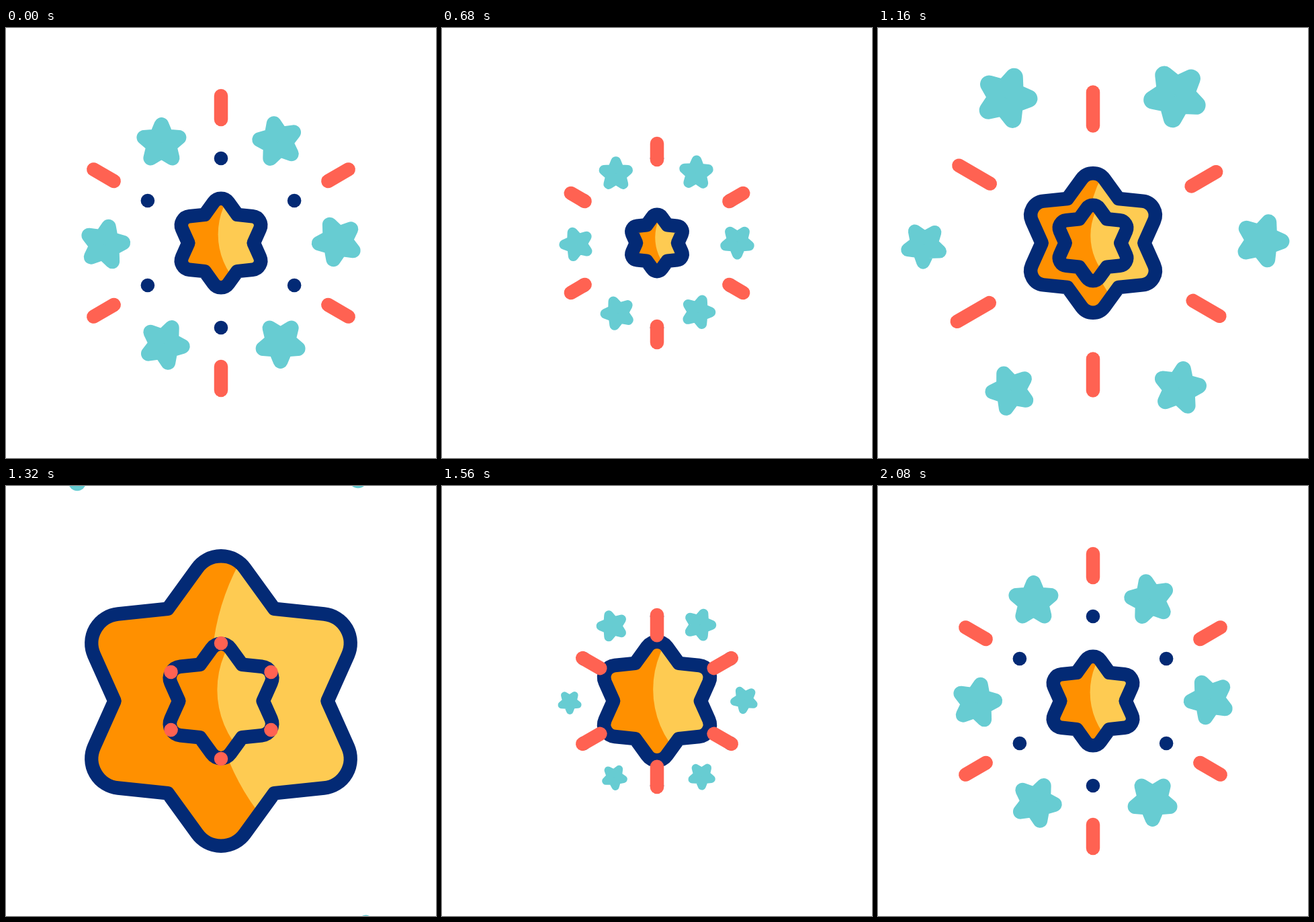
An HTML page with a canvas for the animation above (2640 ms loop, 640 by 640 pixels).

```html
<!DOCTYPE html>
<html lang="en">
<head>
<meta charset="utf-8">
<title>Star burst</title>
<style>
  html, body { margin: 0; width: 100%; height: 100%; overflow: hidden; background: #fff; }
  canvas { display: block; }
</style>
</head>
<body>
<canvas id="stage" width="640" height="640"></canvas>
<script>
const ctx = document.getElementById('stage').getContext('2d');
const LOOP = 2640, STEP = 40, REBIRTH = 1320;
const NAVY = '#032a75', ORANGE = '#ff9000', YELLOW = '#fecb52', CORAL = '#ff6252', TEAL = '#67ccd2';
const RAD = Math.PI / 180;

// Smooth monotone interpolation through keyed values
function key(t, times, values) {
  const n = times.length - 1;
  if (t <= times[0]) return values[0];
  if (t >= times[n]) return values[n];
  const i = times.findIndex(x => x > t) - 1;
  const rate = j => (values[j + 1] - values[j]) / (times[j + 1] - times[j]);
  const slope = j => {
    if (j < 1 || j >= n) return 0;
    const a = rate(j - 1), b = rate(j);
    return a * b > 0 ? 2 * a * b / (a + b) : 0;
  };
  const span = times[i + 1] - times[i], u = (t - times[i]) / span, w = u * u * (3 - 2 * u);
  return values[i] * (1 - w) + values[i + 1] * w
    + span * u * (1 - u) * (slope(i) * (1 - u) - slope(i + 1) * u);
}

const easeInOut = u => u < 0.5 ? 4 * u ** 3 : 1 - 4 * (1 - u) ** 3;
const ramp = (t, from, to) => easeInOut(Math.min(1, Math.max(0, (t - from) / (to - from))));
const polar = (r, deg) => [r * Math.cos(deg * RAD), r * Math.sin(deg * RAD)];

// Six-pointed star with rounded tips; h is the distance from centre to tip
function bigStar(h, alpha = 1) {
  if (h <= 0 || alpha <= 0) return;
  const path = new Path2D();
  for (let k = 0; k < 6; k++) {
    const a = k * 60 - 90;
    const notch = polar(h * 0.737, a - 30), next = polar(h * 0.737, a + 30);
    if (k) path.lineTo(...notch); else path.moveTo(...notch);
    path.arcTo(...polar(h * 1.147, a), ...next, h * 0.204);
  }
  path.closePath();
  ctx.save();
  ctx.globalAlpha = alpha;
  ctx.fillStyle = ORANGE;
  ctx.fill(path);
  ctx.save();
  ctx.clip(path);
  ctx.fillStyle = YELLOW;
  ctx.beginPath();
  ctx.arc(h * 1.534, h * -0.195, h * 1.6, 0, 7);
  ctx.fill();
  ctx.restore();
  ctx.strokeStyle = NAVY;
  ctx.lineWidth = Math.min(20.5, h);
  ctx.stroke(path);
  ctx.restore();
}

function smallStar(r, deg, size, turn) {
  if (size <= 0) return;
  ctx.save();
  ctx.translate(...polar(r, deg));
  ctx.rotate(turn * RAD);
  ctx.scale(size / 74, size / 74);
  ctx.beginPath();
  for (let k = 0; k < 10; k++) ctx.lineTo(...polar(k % 2 ? 12.2 : 27.3, k * 36 - 90));
  ctx.closePath();
  ctx.fillStyle = ctx.strokeStyle = TEAL;
  ctx.lineWidth = 22;
  ctx.fill();
  ctx.stroke();
  ctx.restore();
}

function ray(inner, outer, deg) {
  ctx.strokeStyle = CORAL;
  ctx.lineWidth = 20.5;
  ctx.beginPath();
  ctx.moveTo(...polar(inner, deg));
  ctx.lineTo(...polar(outer + 0.01, deg));
  ctx.stroke();
}

// Clockwise from the upper left: size factor, turns on the way out, turns on arrival
const STARS = [
  { f: 0.96, out: [0, 12, 72, 164, 252], back: [-78, -18, 0] },
  { f: 1.00, out: [-12, -24, -70, -173, -252], back: [79, 19, -12] },
  { f: 0.85, out: [-24, -37, -108, -196, -280], back: [104, 44, -24] },
  { f: 0.84, out: [-36, -49, -125, -205, -285], back: [95, 35, -36] },
  { f: 0.79, out: [-48, -35, 51, 122, 216], back: [-102, -42, 24] },
  { f: 0.73, out: [-60, -45, 52, 111, 190], back: [-97, -37, 12] }
];
const OUT = [200, 400, 680, 1160, 1320], BACK = [1320, 1560, 2080];
const RAY_SPREAD = [0, -13, -7, -5, 9, 6];

function drawStars(t) {
  STARS.forEach(({ f, out, back }, i) => {
    const deg = i * 60 - 120.8;
    if (t <= REBIRTH) {
      const r = key(t, [200, 400, 680, 760, 1160, 1320, 1400], [173, 161, 119.5, 115, 251.5, 418, 530]);
      const size = key(t, [200, 400, 680, 760, 1160], [74, 29 + 33 * f, 50.5, 50, 93 * f]);
      smallStar(r, deg, size, key(t, OUT, out));
    } else {
      const r = key(t, [1320, 1560, 1920, 2080], [40, 130, 170, 173]);
      smallStar(r, deg, key(t, BACK, [0, 48 * f, 74]), key(t, BACK, back));
    }
  });
}

function drawRays(t) {
  RAY_SPREAD.forEach((d, i) => {
    const deg = i * 60 - 90;
    if (t < REBIRTH) {
      const times = [200, 400, 680, 760, 1160, 1320];
      ray(key(t, times, [184, 150, 124, 121, 174.5 + d * 0.4, 210]),
          key(t, times, [219, 180, 148, 144, 224.5 + d, 210]), deg);
    } else {
      ray(86 + 98 * ramp(t, 1416, 1880), 86 + 133 * ramp(t, 1320, 1880), deg);
    }
  });
}

function drawDots() {
  ctx.fillStyle = NAVY;
  for (let k = 0; k < 6; k++) {
    ctx.beginPath();
    ctx.arc(...polar(126, k * 60 - 90), 10.3, 0, 7);
    ctx.fill();
  }
}

function draw(t) {
  ctx.setTransform(1, 0, 0, 1, 0, 0);
  ctx.fillStyle = '#fff';
  ctx.fillRect(0, 0, 640, 640);
  ctx.translate(320, 320);
  ctx.lineCap = ctx.lineJoin = 'round';

  if (t < 700 || t >= 1560) drawDots();
  if (t < REBIRTH) drawRays(t);
  drawStars(t);
  if (t < 1440) {
    const h = key(t, [200, 400, 680, 760, 1160, 1320, 1400, 1480],
                     [66, 63, 42, 40, 103.5, 215, 293, 380]);
    bigStar(h, 1 - Math.max(0, t - 1320) / 120);
  }
  if (t > 880) bigStar(key(t, [880, 1160, 1320, 1420, 1560, 1880], [0, 56, 85, 93, 88, 66]));
  if (t >= REBIRTH) drawRays(t);
}

const start = performance.now();
function tick() {
  const t = (performance.now() - start) % LOOP;
  draw(Math.floor(t / STEP) * STEP);
  requestAnimationFrame(tick);
}
tick();
</script>
</body>
</html>
```
